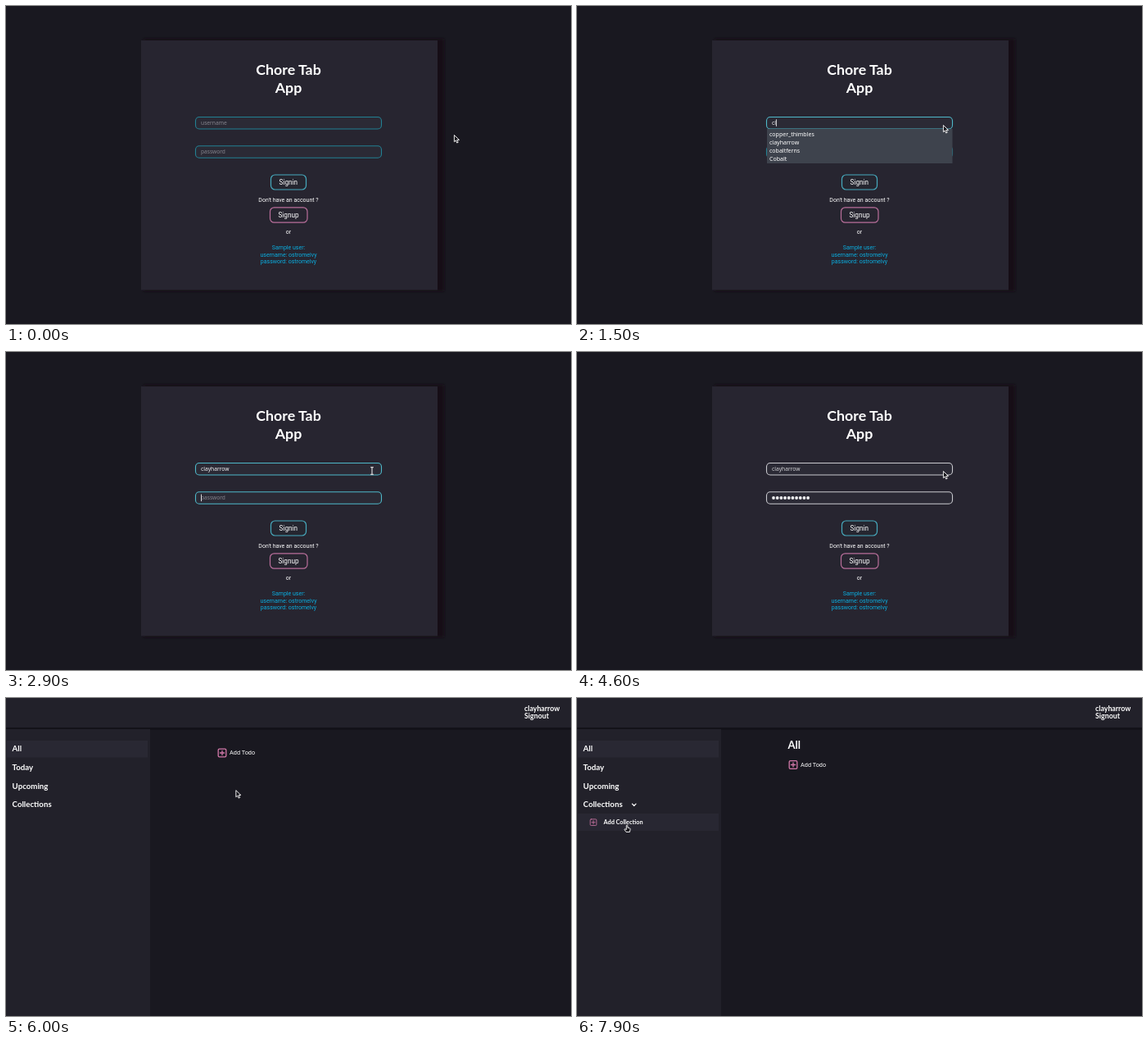
Recreate the animation shown at these times as an HTML page. Size 690 px wide and 388 px high, loop 8000 ms.

```html
<!DOCTYPE html>
<html lang="en">
<head>
<meta charset="utf-8">
<title>Chore Tab</title>
<style>
html, body { margin: 0; width: 100%; height: 100%; overflow: hidden; background: #191820; }
svg { display: block; position: absolute; left: 0; top: 0; }
text { white-space: pre; fill: #fff; }
.lato { font-family: Lato, "Open Sans", sans-serif; font-weight: 700; }
.robo { font-family: Roboto, "Liberation Sans", sans-serif; }
.noto { font-family: "Noto Sans", "Open Sans", sans-serif; }
.mid { text-anchor: middle; }
.line { fill: none; stroke-linecap: round; stroke-linejoin: round; }
.field { fill: #2b2a35; stroke-width: 1.1; }
.pink { stroke: #d278a9; }
</style>
</head>
<body>
<svg width="690" height="388" viewBox="0 0 690 388">
  <defs>
    <filter id="soft" x="-10%" y="-10%" width="120%" height="120%"><feGaussianBlur stdDeviation="1.5"/></filter>
    <g id="plus" class="line pink">
      <rect x="-4.8" y="-4.8" width="9.6" height="9.6" rx="1.4"/>
      <path d="M-2.6 0H2.6M0-2.6V2.6"/>
    </g>
  </defs>
  <rect width="690" height="388" fill="#191820"/>

  <g id="login">
    <rect x="168" y="40" width="367" height="308" fill="#121118" filter="url(#soft)"/>
    <rect x="165" y="42" width="362" height="304.5" fill="#272530"/>
    <g class="lato mid" font-size="17.8">
      <text x="345" y="84">Chore Tab</text>
      <text x="345" y="105.5">App</text>
    </g>
    <rect id="userBox" class="field" x="231.5" y="135.5" width="227" height="14.5" rx="4.5"/>
    <rect id="passBox" class="field" x="231.5" y="170.7" width="227" height="14.5" rx="4.5"/>
    <text id="userText" class="noto" x="238" y="145" font-size="6.7"></text>
    <text id="passHint" class="noto" x="238" y="180.3" font-size="6.6" style="fill:#85848d">password</text>
    <g id="passDots"></g>
    <rect id="caret" width=".8" height="8.6" fill="#fff"/>

    <g class="robo mid">
      <rect x="323.5" y="206" width="43" height="18" rx="5" fill="#252630" stroke="#46aabd" stroke-width="1.2"/>
      <text x="344.8" y="218" font-size="8.2">Signin</text>
      <text x="345" y="238.6" font-size="7">Don't have an account ?</text>
      <rect x="322.5" y="245.8" width="45.5" height="18.4" rx="5" fill="#272530" stroke="#b96f9b" stroke-width="1.2"/>
      <text x="345" y="258" font-size="8.2">Signup</text>
      <text x="345" y="278.2" font-size="7">or</text>
      <g font-size="7">
        <text x="345" y="297" style="fill:#0aaee0">Sample user:</text>
        <text x="345" y="305.6" style="fill:#0aaee0">username: ostromelvy</text>
        <text x="345" y="314.2" style="fill:#0aaee0">password: ostromelvy</text>
      </g>
    </g>
    <g id="list" class="noto" font-size="7">
      <rect id="listBox" x="232" y="150" width="226.5" fill="#3e434d"/>
    </g>
  </g>

  <g id="home">
    <rect y="36" width="690" height="3" fill="#131219"/>
    <rect width="690" height="36" fill="#22212a"/>
    <rect y="38" width="176" height="350" fill="#22212a"/>
    <rect x="1" y="52" width="172" height="20.5" fill="#292833"/>
    <g class="lato" font-size="8.8">
      <text x="633" y="16">clayharrow</text>
      <text x="633" y="25.3">Signout</text>
    </g>
    <g class="lato" font-size="9.7">
      <text x="7.6" y="65.3">All</text>
      <text x="7.6" y="88">Today</text>
      <text x="7.6" y="110.6">Upcoming</text>
      <text x="7.6" y="133.4">Collections</text>
    </g>
    <path id="chevron" class="line" d="M-2.3-1.1L0 1.2L2.3-1.1" stroke="#fff" stroke-width="1.2"/>
    <g id="addRow">
      <rect id="rowHover" x="1" y="141" width="172" height="21" fill="#282732"/>
      <use href="#plus" transform="translate(20 151.7) scale(.8)"/>
      <text class="lato" x="32.5" y="154.2" font-size="7.3">Add Collection</text>
    </g>
    <text id="heading" class="lato" x="257.6" y="62.2" font-size="13">All</text>
    <g id="addTodo">
      <use href="#plus" x="264" y="67" stroke-width="1.3"/>
      <text class="robo" x="273" y="69.4" font-size="7.3">Add Todo</text>
    </g>
  </g>

  <g id="prompt" class="noto" font-size="7.1">
    <path d="M135 5H138L142.500 .8L147 5H352V123H135Z" fill="#42464f"/>
    <g class="line" stroke="#a9abb1" stroke-width="1.9">
      <circle cx="152.700" cy="18" r="3"/>
      <path d="M149.500 18H141.500V20.500M145 18V20"/>
    </g>
    <text x="164.700" y="18.200">Save login for qvm-chore-tab.dovpad.test?</text>
    <text x="164.700" y="33.700">Username</text>
    <rect x="165" y="38" width="182" height="14.500" fill="#3d414b"/>
    <text x="169" y="47.700">clayharrow</text>
    <path class="line" d="M338 44.300L340 46.300L342 44.300" stroke="#fff" stroke-width="1.100"/>
    <text x="164.700" y="61">Password</text>
    <rect x="165" y="65.500" width="186" height="13.500" fill="#3d414b"/>
    <g id="savedDots"></g>
    <rect x="166" y="84.500" width="6.500" height="6.500" rx="1" fill="#2d3038"/>
    <text x="174" y="90.300">S<tspan text-decoration="underline">h</tspan>ow password</text>
    <rect x="135" y="100" width="109" height="23" fill="#5a5d66"/>
    <rect x="220.500" y="102" width=".7" height="19" fill="#62656e"/>
    <rect x="244" y="100" width="108" height="23" fill="#0060df"/>
    <text class="mid" x="178" y="114.500"><tspan text-decoration="underline">D</tspan>on't save</text>
    <text class="mid" x="298" y="114.500"><tspan text-decoration="underline">S</tspan>ave</text>
    <path class="line" d="M229.500 110.800L232 113.300L234.500 110.800" stroke="#fff" stroke-width="1.200"/>
  </g>

  <g id="pointer" stroke="#fff" stroke-width=".9" stroke-linejoin="round" fill="#17161c">
    <path id="arrow" d="M.4.5V8.700L2.300 7L3.700 10L5.200 9.300L3.800 6.400H6.500Z"/>
    <path id="beam" d="M-1.800-4.300H1.800M0-4.300V4.300M-1.800 4.300H1.800" stroke="#d5d5d8" stroke-width="1.200"/>
    <path id="hand" d="M-.7.400Q.300-.500.900.700V3.200L3.500 3.900Q4.300 4.300 4 5.500L3.400 8.500H-1L-3 5.600Q-3 4.500-1.900 4.900L-.7 5.700Z"/>
  </g>
</svg>
<script>
const LOOP = 8000, STEP = 100;
const USER = 'clayharrow';
const names = ['copper_thimbles', USER, 'cobaltferns', 'Cobalt'];
const DIM = [34, 128, 147], BRIGHT = [78, 184, 201];

// time, x, y of the pointer's hot spot
const path = [
  [0, 547, 157], [100, 545, 157], [400, 500, 152], [700, 455, 146], [900, 447, 145],
  [5300, 447, 145], [5400, 352, 137], [5500, 265, 128], [5700, 280, 113],
  [6400, 281, 111], [6500, 200, 118], [6600, 95, 126], [6700, 64, 125],
  [7000, 57, 126], [7200, 63, 126], [7400, 63, 127], [7800, 61, 155]
];
// time, number of characters
const userKeys = [[1300, 1], [1500, 2], [1800, 3], [1900, 4], [2000, 5], [2100, 6], [2200, 7], [2300, 8], [2400, 9], [2500, 10]];
const passKeys = [[3200, 1], [3400, 2], [3600, 3], [3800, 4], [4000, 5], [4100, 6], [4200, 7], [4300, 9], [4400, 10]];

const el = id => document.getElementById(id);
const show = (id, on) => el(id).setAttribute('visibility', on ? 'inherit' : 'hidden');
const set = (id, attrs) => { for (const k in attrs) el(id).setAttribute(k, attrs[k]); };
const clamp = v => Math.max(0, Math.min(1, v));
const during = (t, a, b) => t >= a && t < b;
const typed = (keys, t) => keys.reduce((n, [at, count]) => t >= at ? count : n, 0);

function add(parent, tag, attrs, text = '') {
  const node = document.createElementNS('http://www.w3.org/2000/svg', tag);
  for (const k in attrs) node.setAttribute(k, attrs[k]);
  node.textContent = text;
  el(parent).append(node);
  return node;
}

function addDots(parent, x, y, gap) {
  return Array.from({ length: 10 }, (_, i) =>
    add(parent, 'circle', { cx: x + i * gap, cy: y, r: 1.9, fill: '#f0f0f2' }));
}

const rows = names.map((name, i) => add('list', 'text', { x: 235, y: 158.6 + i * 10.1 }, name));
const dots = addDots('passDots', 240, 178, 4.68);
addDots('savedDots', 171, 72.3, 5);

function pointerAt(t) {
  const i = path.findIndex(p => p[0] > t);
  if (i < 0) return path[path.length - 1].slice(1);
  const [t0, x0, y0] = path[i - 1], [t1, x1, y1] = path[i];
  const k = (t - t0) / (t1 - t0);
  return [x0 + (x1 - x0) * k, y0 + (y1 - y0) * k];
}

function border(t, focusAt) {
  if (t >= 4600) return '#c9c9ce';
  const k = clamp((t - focusAt) / 200);
  return `rgb(${DIM.map((c, i) => c + (BRIGHT[i] - c) * k)})`;
}

function drawLogin(t) {
  const n = typed(userKeys, t), m = typed(passKeys, t);
  const user = el('userText');
  user.textContent = n ? USER.slice(0, n) : 'username';
  user.style.fill = !n ? '#85848d' : t < 4600 ? '#f4f4f6' : '#d0d0d4';
  set('userBox', { stroke: border(t, 900) });
  set('passBox', { stroke: border(t, 2600) });
  show('passHint', !m);
  dots.forEach((d, i) => d.setAttribute('visibility', i < m ? 'inherit' : 'hidden'));

  const inUser = during(t, 1000, 2700), inPass = during(t, 2700, 4600);
  show('caret', inUser || inPass);
  if (inUser) set('caret', { x: 238 + (n ? user.getComputedTextLength() : 0), y: 138.3 });
  if (inPass) set('caret', { x: 238 + m * 4.68, y: 173.6 });

  const full = t < 1600;
  show('list', during(t, 1300, 2500));
  set('listBox', { height: full ? 42 : 12 });
  rows.forEach((r, i) => {
    r.textContent = full ? names[i] : i ? '' : USER;
  });
}

function drawHome(t) {
  const loaded = t >= 7000, open = t >= 7400;
  show('heading', loaded);
  set('addTodo', { transform: `translate(0 ${loaded ? 14.5 : 0})` });
  show('chevron', t >= 6600);
  set('chevron', { transform: `translate(69.7 130.3) rotate(${open ? 0 : -90})` });
  show('addRow', open);
  show('rowHover', t >= 7600);
}

function draw(t) {
  const home = t >= 6000;
  show('login', !home);
  show('home', home);
  if (home) drawHome(t); else drawLogin(t);
  show('prompt', during(t, 4700, 5900));

  const [x, y] = pointerAt(t);
  const beam = during(t, 800, 1300) || during(t, 2500, 4600);
  const hand = t >= 6600;
  set('pointer', { transform: `translate(${x} ${y})` });
  show('beam', beam);
  show('hand', hand);
  show('arrow', !beam && !hand);
}

const start = performance.now();
function tick(now) {
  const t = Math.max(0, now - start) % LOOP;
  draw(Math.floor(t / STEP) * STEP);
  requestAnimationFrame(tick);
}
draw(0);
requestAnimationFrame(tick);
</script>
</body>
</html>
```
